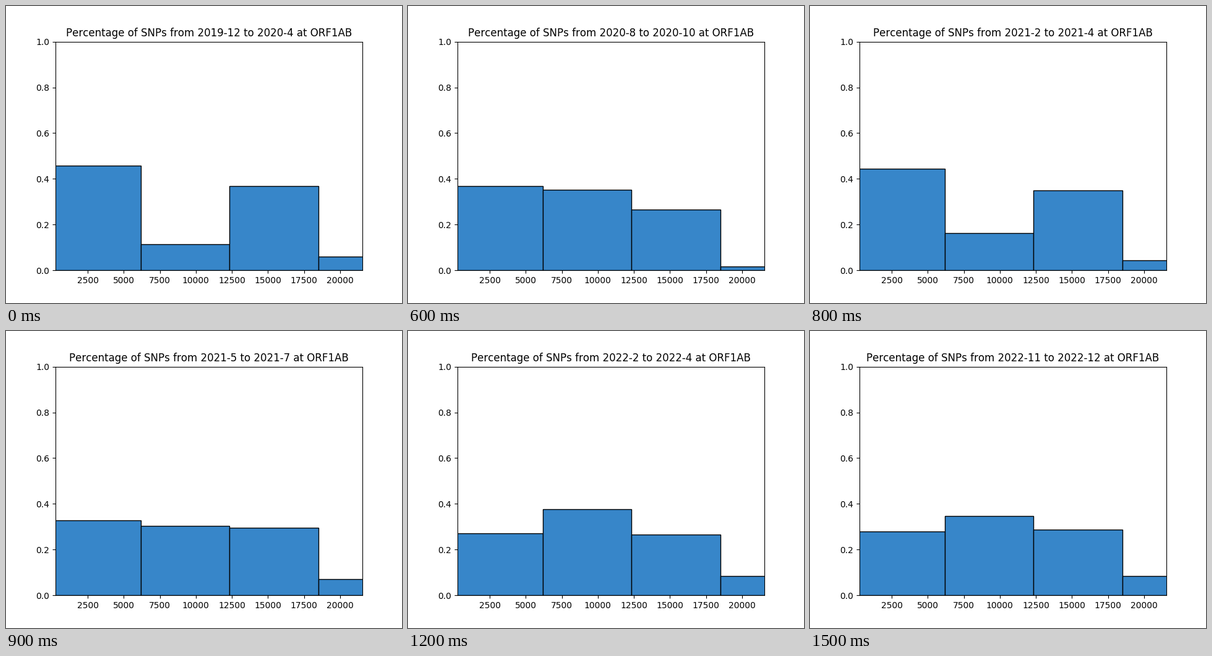
A matplotlib script for the animation above (1.6 s loop, 640x480 px).

```python
import numpy as np
import matplotlib.pyplot as plt
from matplotlib.animation import FuncAnimation

STEP_MS = 100
HOLD = 5  # steps the first period stays on screen
PERIODS = 12
GENE = (266, 21555)
SECTION = 6170  # bases per bar

# Key shares of the first three sections; the fourth takes the rest
KEYS = {
    0: (.457, .114, .368),
    1: (.406, .109, .328),
    2: (.368, .351, .265),
    4: (.444, .162, .350),
    6: (.214, .447, .241),
    8: (.272, .377, .266),
    11: (.280, .347, .288),
}


def shares(k):
    """Bar heights of period k, linear between the key periods."""
    first = [np.interp(k, list(KEYS), col) for col in zip(*KEYS.values())]
    return [*first, 1 - sum(first)]


def month_name(index):
    """Label for a month counted from January 2019."""
    return f"{2019 + index // 12}-{index % 12 + 1}"


def period(k):
    """Quarters that end in December 2022, after a longer first period."""
    start = 13 + 3 * k if k else 11
    end = min(15 + 3 * k, 47)
    return f"{month_name(start)} to {month_name(end)}"


plt.rcParams["text.kerning_factor"] = 6  # whole-pixel kerning

fig, ax = plt.subplots(figsize=(6.4, 4.8), dpi=100)
bars = ax.bar(SECTION * np.arange(4), shares(0), SECTION, align="edge",
              color="#3786c9", edgecolor="black", linewidth=1)
ax.set_xlim(*GENE)
ax.set_ylim(0, 1)
title = ax.set_title("")


def draw(step):
    k = max(0, step - HOLD + 1)
    for bar, share in zip(bars, shares(k)):
        bar.set_height(share)
    title.set_text(f"Percentage of SNPs from {period(k)} at ORF1AB")
    return [*bars, title]


anim = FuncAnimation(fig, draw, frames=HOLD + PERIODS - 1,
                     interval=STEP_MS, repeat=True, repeat_delay=0)
plt.show()
```
